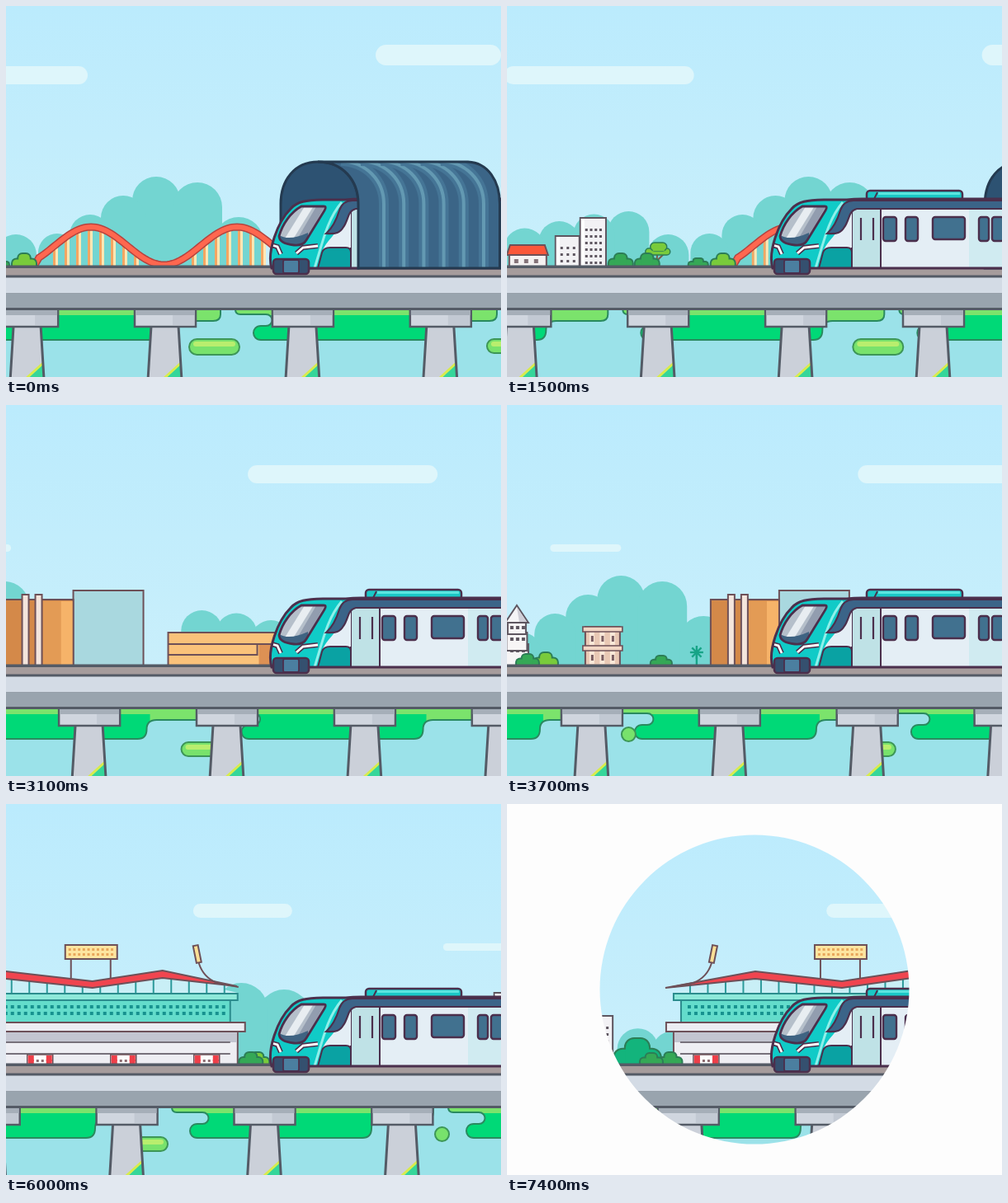
An HTML page with a canvas for the animation above (7500 ms loop, 600x450 px).

```html
<!DOCTYPE html>
<html lang="en">
<head>
<meta charset="utf-8">
<title>Metro ride</title>
<style>
html, body { margin: 0; width: 100%; height: 100%; overflow: hidden; background: #fdfdfd; }
canvas { display: block; width: 600px; height: 450px; }
</style>
</head>
<body>
<canvas id="stage" width="600" height="450"></canvas>
<script>
const g = document.getElementById('stage').getContext('2d');
const LOOP = 7500, STEP = 100, TAU = Math.PI * 2;
const INK = '#4b2f4c', SLATE = '#545b66', BROWN = '#6d5058', STONE = '#5e5660', LEAF = '#2c7d56';
const GREEN = '#35a856', LIME = '#79cb3b';

// the ride: seconds and pixels, joined by a smooth curve
const RIDE = [[0, 0], [1.5, 324], [2.4, 712], [3.7, 1412], [4.8, 2040], [6, 2624], [7.4, 3031]];
const LAST = RIDE.length - 1;

function pace(i) {
  const k = Math.min(Math.max(i, 1), LAST - 1);
  const [a, b, c] = [RIDE[k - 1], RIDE[k], RIDE[k + 1]];
  const h = b[0] - a[0], j = c[0] - b[0];
  const before = (b[1] - a[1]) / h, after = (c[1] - b[1]) / j;
  if (i === 0) return before - (after - before) * h / (h + j);
  if (i === LAST) return after + (after - before) * j / (h + j);
  return (before * j + after * h) / (h + j);
}
function distance(s) {
  let i = 0;
  while (i < LAST - 1 && s > RIDE[i + 1][0]) i++;
  const [t0, p0] = RIDE[i], [t1, p1] = RIDE[i + 1];
  const d = t1 - t0, u = (s - t0) / d, w = 1 - u;
  return p0 * (1 + 2 * u) * w * w + pace(i) * d * u * w * w +
    p1 * u * u * (3 - 2 * u) - pace(i + 1) * d * u * u * w;
}

function path(d, fill, stroke, w = 2) {
  const p = new Path2D(d);
  if (fill) { g.fillStyle = fill; g.fill(p); }
  if (stroke) { g.strokeStyle = stroke; g.lineWidth = w; g.stroke(p); }
}
function rect(x, y, w, h, fill) { g.fillStyle = fill; g.fillRect(x, y, w, h); }
function box(x, y, w, h, r, fill, stroke, lw = 2) {
  g.beginPath();
  g.roundRect(x, y, w, h, r);
  if (fill) { g.fillStyle = fill; g.fill(); }
  if (stroke) { g.strokeStyle = stroke; g.lineWidth = lw; g.stroke(); }
}
function grid(x, y, cols, rows, dx, dy, s, color) {
  for (let r = 0; r < rows; r++)
    for (let c = 0; c < cols; c++) rect(x + c * dx, y + r * dy, s, s, color);
}
function layer(shift, draw) {
  g.save();
  g.translate(shift, 0);
  draw();
  g.restore();
}

function sky() {
  const s = g.createLinearGradient(0, 0, 0, 316);
  s.addColorStop(0, '#bbebfd');
  s.addColorStop(1, '#c9effb');
  rect(0, 0, 600, 450, s);
}
function cloud(x, y, w, h) { box(x, y, w, h, h / 2, '#def6fb'); }
function clouds() {
  cloud(448, 47, 152, 25);
  cloud(-131, 73, 230, 22);
  cloud(-504, 169, 86, 9);
  cloud(-807, 121, 120, 17);
  cloud(-1200, 88, 100, 22);
}

function mound(x, top, r = 25) {
  g.fillStyle = '#73d5d1';
  g.beginPath();
  g.arc(x, top + r, r, Math.PI, 0);
  g.lineTo(x + r, 318);
  g.lineTo(x - r, 318);
  g.fill();
}
function grove(x) {
  for (let i = 0; i < 4; i++) mound(x - 40 * i, 207 + 23 * i, 29 - 2 * i);
  for (let i = 1; i < 3; i++) mound(x + 50 * i, 200 + 14 * i * i, 30);
}
function ridge(x, n, mid, swing, phase) {
  for (let i = 0; i < n; i++) mound(x - 42 * i, mid - swing * Math.cos(i * TAU / 8 - phase));
}
function hills() {
  grove(182);
  grove(-661);
  ridge(12, 1, 277, 0, 0);
  ridge(-36, 9, 261, 12, 0);
  ridge(-840, 8, 256, 13, 2);
  ridge(-1515, 2, 272, 5, 2.4);
  mound(-1148, 225, 32);
  mound(-1200, 217, 32);
}

function bush(x, color, h = 10 + Math.abs(x) % 8, w = 14 + h) {
  const pill = (k, top, grow) =>
    box(x - w * k / 2 - grow, 316 - top - grow, w * k + grow * 2, top + 12, h * .35 + grow, grow > 0 ? LEAF : color);
  for (const grow of [1, -1]) {
    pill(1, h * .6, grow);
    pill(.52, h, grow);
  }
}
function tree(x, y) {
  path(`M${x - 2} 316 L${x} ${y} M${x - 1} ${y + 14} L${x + 8} ${y + 5}`, null, '#7b5a4a');
  box(x - 15, y - 1, 30, 8, 4, LIME, LEAF, 1.5);
  box(x - 9, y - 8, 20, 10, 5, LIME, LEAF, 1.5);
  rect(x - 6, y - 1, 14, 3, LIME);
}
function palm(x) {
  for (let i = 0; i < 8; i++) {
    const a = i * TAU / 8;
    path(`M${x} 300 l${8 * Math.cos(a)} ${8 * Math.sin(a)}`, null, '#17a487', 2.4);
  }
  path(`M${x} 300 V316`, null, '#17a487', 2.4);
}
function cypress(x) { path(`M${x - 4} 316 L${x} 301 L${x + 4} 316Z`, '#26ab8c'); }

function tower(x, top) {
  const w = 29 + (279 - top) / 10, cols = top < 270 ? 4 : 3;
  box(x, top, w, 318 - top, 0, '#f2f1f4', STONE);
  rect(x + 1, top + 1, 4, 316 - top, '#ffffff');
  grid(x + 6, top + 13, cols, Math.floor((306 - top) / 8), (w - 14) / (cols - 1), 8, 3, STONE);
}
function slab(x, y, w, color) { box(x, y, w, 318 - y, 0, color, BROWN); }
function roof(x, y, w) {
  path(`M${x + 4} ${y} H${x + w - 4} L${x + w} ${y + 12} H${x}Z`, '#fb5739', BROWN);
}
function cottage(x) {
  slab(x + 2, 302, 45, '#f5f2f2');
  roof(x - 1, 290, 50);
  grid(x + 8, 307, 3, 1, 12, 1, 5, '#85747a');
}
function terrace(x) {
  slab(x + 3, 269, 42, '#e9c8b4');
  for (const y of [269, 292]) {
    for (let i = 0; i < 3; i++) {
      rect(x + 8 + i * 12.5, y + 6, 6, 16, '#fae8d8');
      rect(x + 10 + i * 12.5, y + 11, 3, 7, '#7a5d62');
    }
    box(x, y, 48, 6, 0, '#f2d6c4', BROWN, 1.6);
  }
}

function archBridge() {
  const height = x => 291 - 23 * Math.cos((x - 103) / 177 * TAU);
  for (let x = 57; x < 340; x += 14) {
    const y = height(x);
    if (y > 306) continue;
    rect(x, y, 3, 316 - y, '#f4a662');
    rect(x + 3, y, 3, 316 - y, '#fde7b4');
  }
  let d = 'M35 314';
  for (let x = 40; x < 350; x += 3) d += ` L${x} ${height(x)}`;
  path(d, null, '#b5433f', 9);
  path(d, null, '#ff674f', 6);
}

function spire(x) {
  for (let i = 0; i < 3; i++) {
    const w = 28 - i * 3, y = 290 - i * 14;
    box(x - w / 2, y, w, 28 - i * 6, 0, '#f7f5f6', STONE);
    grid(x - 8, y + 6, 3, 1, 7, 1, 4, STONE);
  }
  path(`M${x - 14} 264 L${x} 243 L${x + 14} 264Z`, '#f5f4f6', STONE);
  path(`M${x} 245 L${x + 12} 263 H${x + 3}Z`, '#cfced6');
}
function church(c) {
  slab(c - 68, 290, 136, '#f3f1f3');
  spire(c - 81);
  spire(c + 79);
  slab(c - 40, 237, 76, '#f3f1f3');
  path(`M${c - 23} 209 H${c + 22} L${c + 39} 238 H${c - 43}Z`, '#f25558', BROWN);
  path(`M${c - 8} 209 l-7 28 M${c + 9} 209 l8 28`, null, '#c8454e', 1.5);
  box(c - 11, 187, 23, 22, [11, 11, 0, 0], '#f4bb43', BROWN);
  path(`M${c} 188 V175 M${c - 4} 179 H${c + 5}`, null, BROWN);
}

function lamp(x, dir) {
  g.save();
  g.translate(x, 182);
  g.scale(dir, 1);
  path('M-2 11 C-6 24 -14 31 -24 35 L-50 40', null, BROWN);
  g.rotate(.2);
  box(-3, -10.5, 6, 21, 0, '#fbdf95', BROWN);
  g.restore();
}
function stadium() {
  path('M202 229 L301 208 L406 220 L491 207 L582 229 V233 H202Z', '#c9eff6');
  for (let x = 222; x < 575; x += 21.5) {
    const peak = x < 400 ? 301 : 491;
    path(`M${x} ${212 + Math.abs(x - peak) * .09} V232`, null, '#2c9a9a');
  }
  box(211, 236, 362, 30, 0, '#63dccb', '#2b8c8d');
  box(202, 230, 380, 8, 0, '#8ee9da', '#2b8c8d');
  grid(219, 244, 44, 2, 8, 8, 4, '#17928f');
  path('M192 223 L301 203 L406 215 L491 202 L581 221 L491 211 L406 223 L301 212Z', '#f0454f', BROWN);
  path('M380 188 V211 M428 188 V211', null, BROWN);
  box(373, 171, 63, 17, 0, '#fde5a0', BROWN);
  grid(377, 175, 10, 2, 5.7, 6, 3, '#e8a75c');
  lamp(250, 1);
  lamp(533, -1);
  slab(202, 276, 380, '#eeeef3');
  rect(203, 277, 378, 12, '#c3c5d0');
  path('M210 289 H573 M210 303 H573', null, '#77717b');
  for (let i = 0; i < 4; i++) {
    const x = 226 + i * 101;
    box(x, 304, 31, 14, 0, '#ffffff', BROWN, 1.5);
    grid(x + 1, 305, 2, 2, 22, 5, 7, '#ee3f49');
    grid(x + 11, 310, 2, 1, 6, 1, 3, '#8c6b70');
  }
  box(193, 265, 398, 11, 0, '#ecedf2', BROWN);
}

function town() {
  archBridge();
  tower(-151, 257);
  tower(-181, 279);
  cottage(-239);
  terrace(-317);
  roof(-317, 257, 48);
  cypress(-328);
  palm(-444);
  palm(-424);
  slab(-600, 276, 144, '#fac27a');
  rect(-490, 290, 33, 26, '#dd9154');
  path('M-600 290 H-457 M-600 303 H-492 V291', null, BROWN);

  slab(-715, 225, 85, '#a9d8df');
  slab(-798, 236, 83, '#d48949');
  rect(-752, 238, 22, 78, '#e39b55');
  rect(-730, 238, 14, 78, '#f6b369');
  for (const x of [-777, -761]) box(x, 230, 8, 87, 0, '#f4e5dc', BROWN);
  palm(-815);
  terrace(-953);
  church(-1112);

  cypress(-1221);
  for (let i = 0; i < 3; i++) tower(-1284 - i * 33, 279 - i * 25);
  slab(-1565, 276, 63, '#f7c95f');
  slab(-1502, 297, 72, '#fbd36c');
  grid(-1494, 302, 9, 2, 7, 6, 3, '#8b6950');
  layer(-2243, stadium);
  tower(-2146, 257);

  tree(-57, 295);
  tree(-1360, 295);
  bush(-2085, '#13b47c', 32, 58);
  for (const x of [22, -262, -382, -998, -1637]) bush(x, LIME);
  for (const x of [-8, -70, -102, -355, -858, -1020, -1245, -1371, -1400, -1645, -2045, -2068]) bush(x, GREEN);
}

// a grass bank: strip along the deck, lawn below it
function bank(x) {
  const left = x + 22, right = x + 242, end = x + 317;
  const d = `M${x + 6} 366 H${end} V374 Q${end} 382 ${end - 9} 382 H${right + 12} Q${right} 382 ${right} 393 ` +
    `Q${right} 405 ${right - 11} 405 H${left + 9} C${left - 3} 405 ${left - 3} 388 ${left + 9} 388 H${left + 15} ` +
    `C${left + 25} 388 ${left + 25} 374 ${left + 15} 374 H${x + 6} Q${x} 374 ${x} 368Z`;
  g.save();
  path(d, '#00d977');
  g.clip(new Path2D(d));
  rect(x, 366, 320, 9, '#7be36c');
  rect(right + 4, 366, 80, 18, '#7be36c');
  g.restore();
  path(d, null, '#2a8a5f');
}
function pond(x, y, w, h = 17) {
  box(x, y, w, h, h / 2, '#78e26c', '#3d9657');
  if (w > h) box(x + 5, y + 3, w - 10, 6, 3, '#b9ee6e');
}
function banks() {
  for (let i = 0; i < 7; i++) bank(278 - 335 * i);
  pond(222, 404, 61, 19);
  pond(583, 404, 50);
  pond(-443, 409, 54);
  pond(-1447, 404, 45);
  pond(-721, 391, 17);
  pond(-1078, 392, 17);
}

function pillar(x) {
  path(`M${x + 20} 388 H${x + 53} L${x + 57} 454 H${x + 16}Z`, '#cbd0d9');
  path(`M${x + 35} 454 L${x + 56} 434 V454Z`, '#35d69a');
  path(`M${x + 34} 453 L${x + 56} 433`, null, '#d8ec4c', 3);
  path(`M${x + 20} 388 L${x + 16} 454 M${x + 53} 388 L${x + 57} 454`, null, SLATE, 3);
  box(x, 367, 74, 22, 0, '#d0d6df', SLATE, 2.5);
  rect(x + 1, 368, 72, 7, '#a6afb9');
  rect(x + 46, 375, 26, 12, '#c2c9d3');
}
function deck(shift) {
  const gap = 166.9;
  for (let x = (156 + shift) % gap - gap; x < 600; x += gap) pillar(x);
  rect(0, 314.5, 600, 54.5, SLATE);
  rect(0, 318, 600, 8.5, '#a69c9c');
  rect(0, 329.5, 600, 19, '#d3dbe5');
  rect(0, 348.5, 600, 17.5, '#99a4ae');
}

function tunnelInside() {
  path('M333 318 V240 C333 211 350 189 378 189 C408 189 427 211 427 240 V318Z', '#2d5272', '#243a50', 3);
}
function tunnelWall() {
  const d = 'M378 189 H560 C584 190 598.5 212 598.5 240 V318 H427 V240 C427 211 408 189 378 189Z';
  g.save();
  path(d, '#3b6587');
  g.clip(new Path2D(d));
  for (let x = 406; x < 540; x += 24.2) {
    const rib = `M${x} 188 c30 1 52 23 52 52 V318`;
    path(rib, null, '#457596', 12);
    path(rib, null, '#6399b2', 4);
  }
  g.restore();
  path(d, null, '#243a50', 3);
}

function train() {
  // roof unit
  box(436, 224, 116, 12, 4, '#1bc8c6', INK, 2.5);
  path('M450 227.5 H549', null, '#5be5df', 3);
  path('M445 234 L449 226', null, INK);

  // side
  path('M395 240 H606 V318 H378Z', '#e4eef5');
  rect(560, 246, 46, 72, '#d0ebf1');
  box(418, 246, 35, 72, 0, '#bfe2e6', INK);
  path('M429 257 V284 M444 257 V284', null, INK, 2.2);
  for (const [x, w] of [[456, 16], [483, 15], [516, 39], [572, 12], [588, 14]])
    box(x, 256, w, w > 30 ? 27 : 29, 3, '#41718f', INK, 2.4);

  // nose
  path('M321 318 C316 298 329 262 345 246 C353 237 364 236 384 235 H420 L414 252 C408 270 390 282 384 296 L378 318Z', '#10cbc7');
  path('M384 296 L418 250 V293 H390Z', '#e4eef5');
  path('M378 318 L383 299 Q385 293 393 293 H412 Q418 293 418 299 V318Z', '#0aa2a3', INK);
  path('M407 238 C390 258 385 282 374 318', null, '#8ff0ea', 3);
  path('M404 248 Q408 236 420 236 H606 V246 H424 C414 248 415 260 409 268 C405 275 400 277 388 276 C397 268 401 258 404 248Z', '#3b6488', INK, 2.2);

  // windshield
  const glass = 'M358 243 H385 Q389 243 386 248 L364 284 Q360 291 349 290 Q331 288 331 279 C335 265 345 250 358 243Z';
  g.save();
  path(glass, '#b5bfca');
  g.clip(new Path2D(glass));
  path('M368 242 L342 284', null, '#e8edf1', 9);
  path('M382 242 L354 290', null, '#929daf', 9);
  path('M330 277 Q342 286 366 275 V295 H330Z', '#3f6382');
  g.restore();
  path(glass, null, INK, 2.8);

  // lights, outline, coupler
  const lights = 'M322 290 L329 292 L333 301 M352 300 L360 293 L378 291';
  path(lights, null, INK, 6);
  path(lights, null, '#ffffff', 2.8);
  path('M606 318 H322 C316 298 329 262 345 246 C353 237 364 235.5 384 235 H412 Q420 234 430 234 H606', null, INK, 3);
  box(324, 307, 43, 18, 4, '#35506f', INK, 2.6);
  box(336, 308, 19, 16, 2, '#4b7fa0', INK, 1.8);
}

function iris(t) {
  const u = (t - 7200) / 200;
  if (u <= 0) return;
  g.fillStyle = '#fdfdfd';
  g.beginPath();
  g.rect(0, 0, 600, 450);
  g.moveTo(600, 225);
  g.arc(300, 225, 375 - 187.5 * u ** 1.4, 0, TAU);
  g.fill('evenodd');
}

function render(t) {
  const s = distance(t / 1000);
  sky();
  layer(s * .394, clouds);
  layer(s * .566, hills);
  layer(s * .74, town);
  rect(0, 316, 600, 134, '#9be2e9');
  layer(s * .609, banks);
  deck(s);
  layer(s * .76, tunnelInside);
  train();
  layer(s * .76, tunnelWall);
  iris(t);
}

const start = performance.now();
function tick() {
  const t = (performance.now() - start + 20) % LOOP;
  render(Math.floor(t / STEP) * STEP);
  requestAnimationFrame(tick);
}
tick();
</script>
</body>
</html>
```
